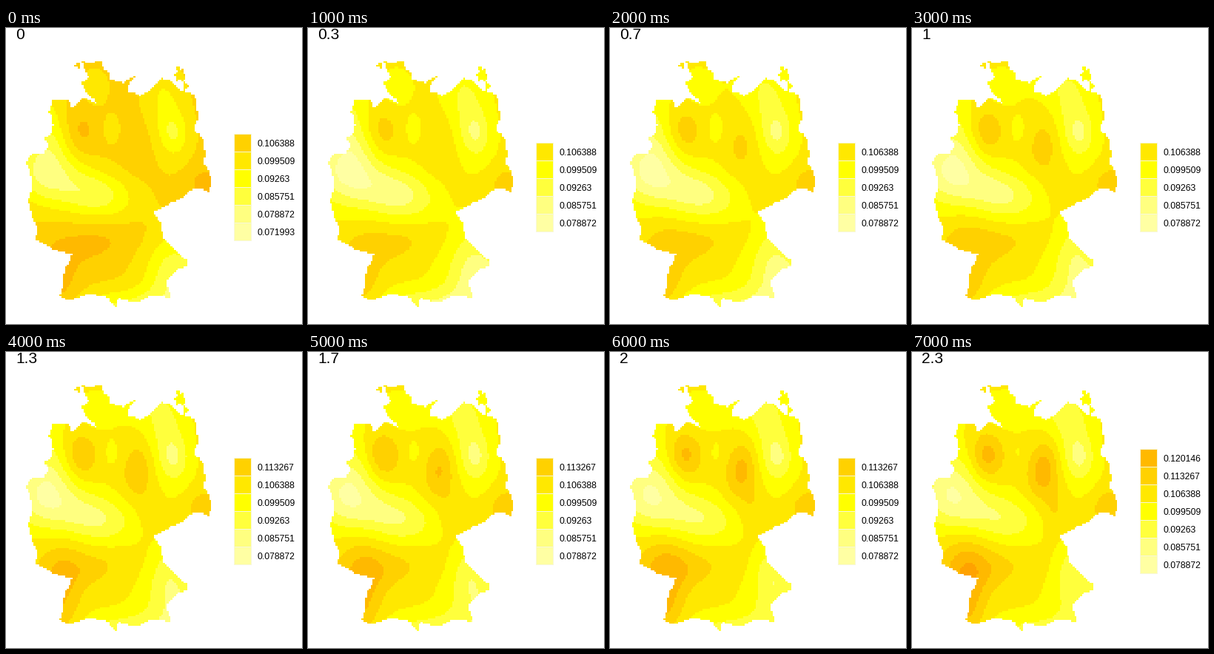
A matplotlib script that plays this animation: 400x400 px, repeating every 8000 ms.

```python
import numpy as np
import matplotlib.pyplot as plt
from matplotlib.animation import FuncAnimation
from matplotlib.path import Path
from matplotlib.patches import Rectangle

SIZE, DPI, CELL = 400, 100, 2.5
STEPS = 8
BASE = 4.3                       # level of the undisturbed surface
BREAK0, BREAK_STEP = 0.071993, 0.006879
FONT = "Liberation Sans"

# Pale yellows, then an even ramp from yellow towards red
COLORS = [(255, 255, b) for b in (163, 128, 60)]
COLORS += [(255, round(255 * (1 - k / 11)), 0) for k in range(5)]

# Corners of the border, clockwise from the north-west
BORDER = [(102, 44), (130, 46), (132, 55), (141, 60), (138, 68), (159, 74),
          (174, 66), (163, 86), (180, 92), (198, 81), (210, 68), (222, 70),
          (235, 84), (256, 92), (261, 121), (255, 138), (267, 150), (271, 170),
          (267, 183), (279, 207), (274, 222), (260, 216), (237, 230),
          (209, 244), (199, 248), (209, 264), (213, 285), (234, 305),
          (245, 314), (244, 323), (235, 324), (217, 343), (224, 366),
          (201, 362), (179, 370), (153, 366), (149, 378), (139, 366),
          (118, 360), (84, 367), (72, 363), (79, 325), (90, 306), (60, 297),
          (40, 286), (44, 269), (36, 256), (31, 230), (35, 208), (27, 182),
          (36, 170), (52, 170), (59, 158), (51, 150), (62, 143), (63, 120),
          (58, 114), (63, 98), (85, 97), (90, 109), (103, 94), (126, 104),
          (110, 90), (101, 76), (113, 67)]
ISLANDS = [(97, 51, 5, 3), (235, 64, 7, 9), (232, 55, 3, 3), (243, 79, 4, 6)]

# Hills and hollows: x, y, width, height, tilt, strength at start and at end
BUMPS = [
    (52, 190, 30, 33, 0, -3.4, -3.1),       # west
    (118, 224, 38, 23, 12, -3.0, -2.2),
    (58, 125, 16, 35, 0, -1.4, -0.3),
    (102, 141, 15, 22, 0, 1.1, 2.3),        # north
    (143, 137, 8, 14, 0, -0.9, -0.4),
    (178, 160, 14, 26, 8, 0.4, 2.4),
    (193, 215, 12, 25, 0, 0.0, 0.9),
    (120, 82, 14, 20, 0, -0.8, -0.3),
    (150, 80, 50, 18, 0, 0.0, -0.9),
    (218, 115, 20, 50, -11, -1.6, -1.8),    # east
    (227, 143, 12, 18, 0, -1.2, -1.2),
    (268, 210, 20, 18, 0, 1.1, 1.5),
    (74, 286, 26, 28, 0, 0.0, 1.9),         # south
    (112, 293, 40, 18, -12, 1.05, 0.8),
    (74, 345, 18, 35, 0, 1.1, 2.0),
    (232, 343, 32, 40, 0, -3.2, -1.5),
    (218, 295, 16, 28, 0, -0.3, -1.5),
    (160, 378, 50, 18, 0, -2.4, -1.5)]

rng = np.random.default_rng(4)


def roughen(points, rounds=2, amount=0.09):
    """Split every edge and push its middle sideways."""
    p = np.array(points, float)
    for _ in range(rounds):
        edge = np.roll(p, -1, axis=0) - p
        side = np.c_[-edge[:, 1], edge[:, 0]]
        push = rng.uniform(-amount, amount, (len(p), 1))
        p = np.stack([p, p + edge / 2 + side * push], 1).reshape(-1, 2)
    return p


def blob(x, y, rx, ry, n=12):
    a = np.linspace(0, 2 * np.pi, n, endpoint=False)
    r = rng.uniform(0.6, 1.2, n)
    return np.c_[x + rx * r * np.cos(a), y + ry * r * np.sin(a)]


def bump(x, y, width, height, tilt):
    a = np.radians(tilt)
    dx, dy = gx - x, gy - y
    u = dx * np.cos(a) + dy * np.sin(a)
    v = dy * np.cos(a) - dx * np.sin(a)
    return np.exp(-((u / width) ** 2 + (v / height) ** 2) / 2)


centres = np.arange(CELL / 2, SIZE, CELL)
gx, gy = np.meshgrid(centres, centres)
grid = np.c_[gx.ravel(), gy.ravel()]
inside = np.zeros(gx.shape, bool)
for shape in [roughen(BORDER)] + [blob(*island) for island in ISLANDS]:
    inside |= Path(shape).contains_points(grid).reshape(gx.shape)

first = BASE + sum(b[5] * bump(*b[:5]) for b in BUMPS)
last = BASE + sum(b[6] * bump(*b[:5]) for b in BUMPS)
palette = np.array(COLORS, np.uint8)

fig = plt.figure(figsize=(SIZE / DPI, SIZE / DPI), dpi=DPI, facecolor="white")
ax = fig.add_axes([0, 0, 1, 1])
ax.axis("off")


def key_count(step):
    return 6 if step == 0 else 5 + (step >= 4) + (step >= 7)


def raster(step):
    level = first + (last - first) * step / (STEPS - 1)
    index = np.floor(level).astype(int) + (step == 0)  # first scale starts lower
    colors = palette[np.clip(index, 0, key_count(step))]
    return np.where(inside[..., None], colors, np.uint8(255))


area = ax.imshow(raster(0), extent=(0, SIZE, SIZE, 0), interpolation="nearest")
ax.set_xlim(0, SIZE)
ax.set_ylim(SIZE, 0)
ax.set_aspect("auto")
title = ax.text(13, 15, "", family=FONT, fontsize=15.1, va="baseline")

keys = []
for k in range(key_count(STEPS - 1)):
    swatch = ax.add_patch(Rectangle((308, 0), 23, 24, lw=0.72, ec="#f7f7d8",
                                    fc=palette[k] / 255))
    text = ax.text(339, 0, "", family=FONT, fontsize=8.8, va="baseline")
    keys.append((swatch, text))


def draw(step):
    area.set_data(raster(step))
    title.set_text(f"{round(step / 3, 1):g}")
    count = key_count(step)
    base = BREAK0 + (BREAK_STEP if step else 0)
    for k, (swatch, text) in enumerate(keys):
        top = 215 + 12 * count - 24 * (k + 1)
        swatch.set_y(top)
        text.set_y(top + 17)
        text.set_text(f"{round(base + k * BREAK_STEP, 6):g}")
        swatch.set_visible(k < count)
        text.set_visible(k < count)
    return [area, title] + [part for key in keys for part in key]


anim = FuncAnimation(fig, draw, frames=STEPS, interval=1000, repeat=True,
                     repeat_delay=0, blit=False)
plt.show()
```
